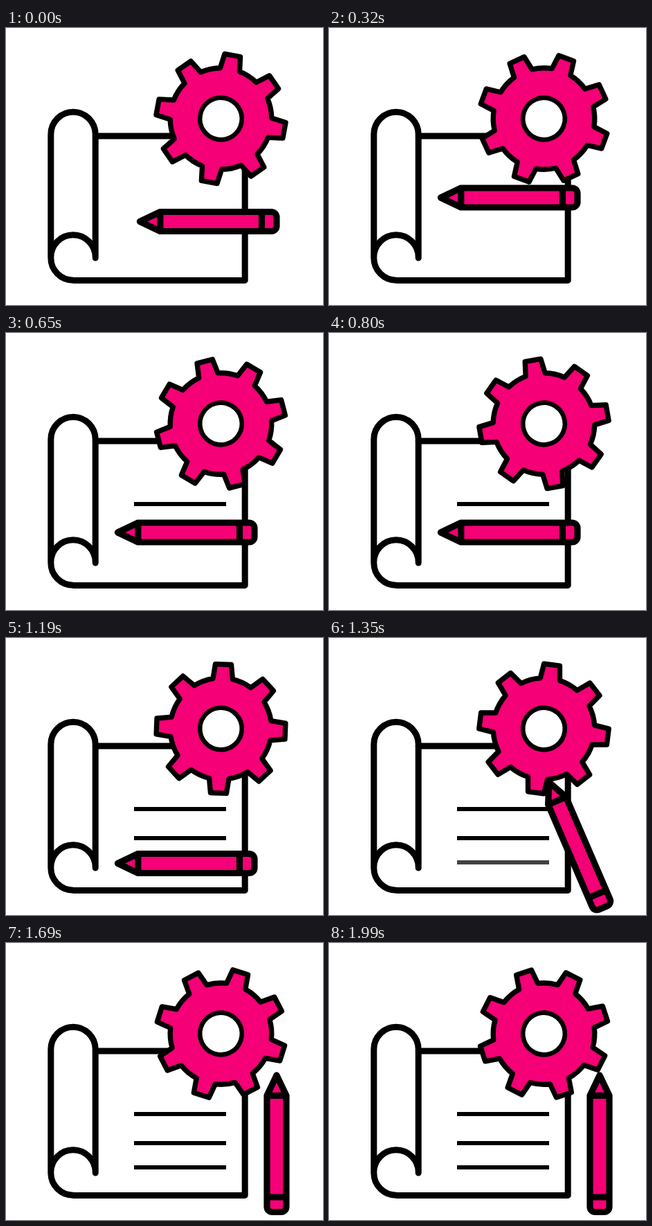
Animation, 458 px wide and 400 px high, one loop 2150 ms. Source, as an HTML page with a canvas:

```html
<!DOCTYPE html>
<html lang="en">
<head>
<meta charset="utf-8">
<title>Blueprint, gear and pencil</title>
<style>
  html, body { margin: 0; width: 100%; height: 100%; overflow: hidden; background: #fff; }
  canvas { display: block; }
</style>
</head>
<body>
<canvas id="stage" width="458" height="400"></canvas>
<script>
const ctx = document.getElementById('stage').getContext('2d');
const LOOP = 2150;
const PINK = '#f50076';
const TAU = Math.PI * 2;
const rad = deg => deg * Math.PI / 180;

// The picture moves in steps and rests between them.
const STEPS = [0, 180, 250, 320, 390, 480, 560, 650, 720, 800, 1050, 1120, 1190,
  1270, 1350, 1430, 1510, 1590, 1690, 1750, 1830, 1910, 1990];

// Pencil poses: centre and angle.
const POSES = [
  { x: 293, y: 279.5, a: 0 },
  { x: 261, y: 245, a: 0 },
  { x: 261, y: 288, a: 0 },
  { x: 261, y: 325.5, a: 0 },
  { x: 391, y: 290.5, a: 90 }
];
const MOVES = [[110, 320], [390, 650], [980, 1190], [1190, 1430]];
const ROWS = [247, 289, 324];

const mix = (a, b, p) => a + (b - a) * p;

function ease(t, [from, to]) {
  const p = Math.min(1, Math.max(0, (t - from) / (to - from)));
  return p * p * (3 - 2 * p);
}

function pen(width) {
  ctx.lineWidth = width;
  ctx.strokeStyle = '#000';
  ctx.lineCap = ctx.lineJoin = 'round';
}

function drawPaper() {
  pen(9);
  ctx.beginPath();
  ctx.moveTo(129, 156);
  ctx.lineTo(345.2, 156);
  ctx.lineTo(345.2, 364.4);
  ctx.lineTo(97, 364.4);
  ctx.arc(97, 332, 32.2, Math.PI / 2, Math.PI);
  ctx.lineTo(64.8, 153.5);
  ctx.arc(97, 153.5, 32.2, Math.PI, TAU);
  ctx.lineTo(129.2, 332);
  ctx.arc(97, 331, 32.2, 0, Math.PI, true);
  ctx.stroke();
}

function drawRow(y, alpha) {
  ctx.globalAlpha = alpha;
  ctx.fillStyle = '#000';
  ctx.fillRect(185, y - 3, 133, 6);
  ctx.globalAlpha = 1;
}

function drawGear(angle) {
  const root = 73.3, tip = 93, half = 11.5;
  const base = Math.asin(14.2 / root);
  ctx.save();
  ctx.translate(310.5, 131);
  ctx.rotate(rad(angle));
  ctx.beginPath();
  for (let i = 0; i < 8; i++) {
    const a = i * TAU / 8;
    const c = Math.cos(a), s = Math.sin(a);
    ctx.arc(0, 0, root, a - TAU / 8 + base, a - base);
    ctx.lineTo(tip * c + half * s, tip * s - half * c);
    ctx.lineTo(tip * c - half * s, tip * s + half * c);
  }
  ctx.closePath();
  ctx.fillStyle = PINK;
  ctx.fill();
  pen(7.4);
  ctx.stroke();
  ctx.beginPath();
  ctx.arc(0, 0, 30.3, 0, TAU);
  ctx.fillStyle = '#fff';
  ctx.fill();
  pen(6.6);
  ctx.stroke();
  ctx.restore();
}

function drawPencil({ x, y, a }) {
  const h = 14;
  ctx.save();
  ctx.translate(x, y);
  ctx.rotate(rad(a));
  ctx.beginPath();
  ctx.moveTo(-99.6, 0);
  ctx.lineTo(-70.2, -h);
  ctx.arcTo(98, -h, 98, h, 7.6);
  ctx.arcTo(98, h, -70.2, h, 7.6);
  ctx.lineTo(-70.2, h);
  ctx.closePath();
  ctx.fillStyle = PINK;
  ctx.fill();
  pen(9.2);
  for (const d of [-70.2, 76.5]) {
    ctx.moveTo(d, -h);
    ctx.lineTo(d, h);
  }
  ctx.stroke();
  ctx.restore();
}

function pencilPose(progress) {
  let pose = POSES[0];
  progress.forEach((p, i) => {
    const next = POSES[i + 1];
    pose = { x: mix(pose.x, next.x, p), y: mix(pose.y, next.y, p), a: mix(pose.a, next.a, p) };
  });
  return pose;
}

function draw(now) {
  const time = now % LOOP;
  const t = STEPS.filter(s => s <= time).pop() || 0;
  const progress = MOVES.map(m => ease(t, m));

  ctx.fillStyle = '#fff';
  ctx.fillRect(0, 0, 458, 400);
  drawPaper();
  ROWS.forEach((y, i) => drawRow(y, progress[i + 1]));
  drawGear(10.4 + t * 0.0309);
  drawPencil(pencilPose(progress));
}

let start;
function tick(now) {
  start ??= now;
  draw(now - start);
  requestAnimationFrame(tick);
}
draw(0);
requestAnimationFrame(tick);
</script>
</body>
</html>
```
